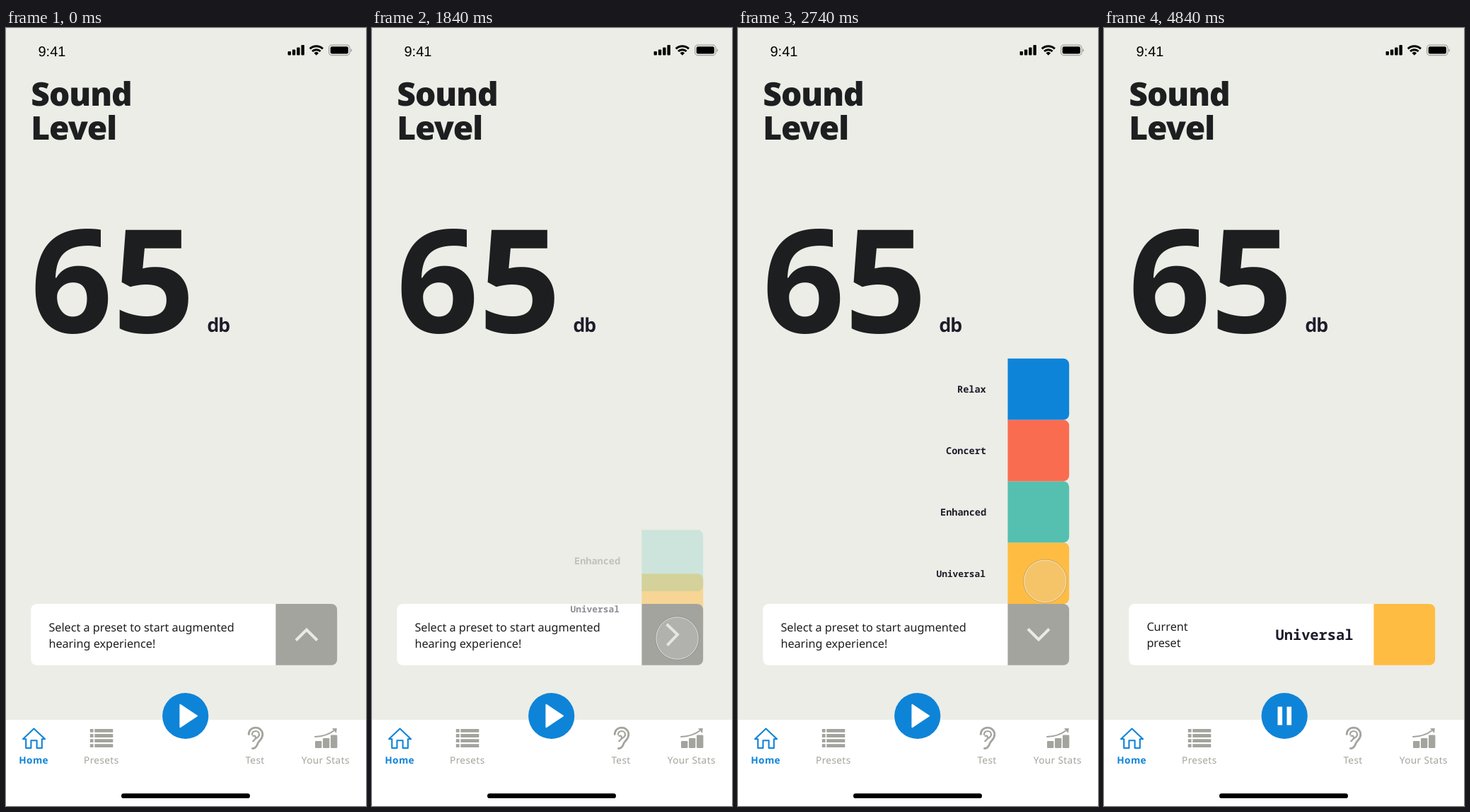
An HTML page for the animation above (5.42 s loop, 509x1101 px).

```html
<!DOCTYPE html>
<html lang="en">
<head>
<meta charset="utf-8">
<title>Sound Level</title>
<style>
  html, body { margin: 0; width: 100%; height: 100%; overflow: hidden; background: #ecede6; }
  svg { display: block; width: 509px; height: 1101px; text-rendering: geometricPrecision; }
  text { fill: #1d1e20; white-space: pre; }
  .body { font: 400 16.2px "Noto Sans", "Open Sans", sans-serif; }
  .title { font: 800 46.1px "Open Sans", sans-serif; letter-spacing: -1px; }
  .mono { font: 600 13.57px "Noto Sans Mono", monospace; fill: #1e1c2b; }
  .tab { font: 400 13.57px "Noto Sans", "Open Sans", sans-serif; letter-spacing: .4px; text-anchor: middle; fill: #a3a49d; }
  .gray { fill: #a3a49d; }
  .blue { fill: #0e84d8; }
  .line { fill: none; stroke: #a3a49d; stroke-width: 2.8; stroke-linecap: round; stroke-linejoin: round; }
</style>
</head>
<body>
<svg viewBox="0 0 509 1101">
  <rect width="509" height="1101" fill="#ecede6"/>

  <!-- status bar -->
  <text x="45.5" y="39.5" style="font:20px 'Liberation Sans',Arial,sans-serif;fill:#000">9:41</text>
  <g>
    <rect x="398.5" y="33" width="4.4" height="5.5" rx="1"/>
    <rect x="404.8" y="30.5" width="4.4" height="8" rx="1"/>
    <rect x="411.1" y="27.5" width="4.4" height="11" rx="1"/>
    <rect x="417.4" y="24" width="4.4" height="14.5" rx="1"/>
  </g>
  <g fill="none" stroke="#000" stroke-width="2.9">
    <path d="M429.7 29.4a13.2 13.2 0 0 1 18.2 0"/>
    <path d="M433 33a8.4 8.4 0 0 1 11.6 0"/>
  </g>
  <path d="M438.8 38.8l-3.3-3.4a4.8 4.8 0 0 1 6.6 0z"/>
  <rect x="456.6" y="24.2" width="29.4" height="14.4" rx="4" fill="none" stroke="#a0a19d" stroke-width="1.2"/>
  <rect x="458.7" y="26.3" width="25.2" height="10.2" rx="2.2"/>
  <path d="M487.4 29v5q1.7-1 1.7-2.5t-1.7-2.5" fill="#a0a19d"/>

  <text class="title" x="35.3" y="110">Sound</text>
  <text class="title" x="35.3" y="158">Level</text>
  <text x="34.6" y="430.8" style="font:700 203.5px 'Open Sans',sans-serif">65</text>
  <text class="mono" x="284.5" y="430" style="font-size:27.1px">db</text>

  <g id="tiles"></g>

  <!-- preset card -->
  <rect x="35.3" y="815" width="432.9" height="86.8" rx="8.1" fill="#fff"/>
  <path id="side" d="M381.4 815h78.7a8.1 8.1 0 0 1 8.1 8.1v70.6a8.1 8.1 0 0 1-8.1 8.1h-78.7z"/>
  <g id="prompt">
    <text class="body" x="60.4" y="854">Select a preset to start augmented</text>
    <text class="body" x="60.4" y="877">hearing experience!</text>
    <path id="chevron" d="M410 866.5l15-15 15 15" fill="none" stroke="#e9eae3" stroke-width="4"/>
  </g>
  <g id="current">
    <text class="body" x="60.4" y="853">Current</text>
    <text class="body" x="60.4" y="876">preset</text>
    <text class="mono" x="242.5" y="866" style="font-size:20.36px">Universal</text>
  </g>
  <g id="names"></g>

  <!-- tab bar -->
  <rect y="979" width="509" height="122" fill="#fff"/>
  <path d="M24 1006.2L39.5 991.5 55 1006.2H50.8V1019H43.6V1008.2H35.4V1019H28.2V1006.2z" fill="none" stroke="#0e84d8" stroke-width="2.1" stroke-linejoin="round"/>
  <path d="M121.2 992v27" fill="none" stroke="#a3a49d" stroke-width="4.8" stroke-dasharray="4.8 2.3"/>
  <path d="M138.3 992v27" fill="none" stroke="#a3a49d" stroke-width="26" stroke-dasharray="4.8 2.3"/>
  <path class="line" d="M343.2 999.5c0-5.5 4.2-9.3 9.8-9.3s9.8 4 9.8 9.6c0 7.2-5.6 8.6-7.2 13.4-1.1 3.3-2.6 6.4-7.2 6.4"/>
  <path class="line" d="M348 1000c0-3 2-5 5-5s5 2.2 5 5c0 3.4-3.4 4.4-5.6 6.2m-3-4.4c3-.8 4.6 1.4 3 4.2-.8 1.4-1.8 2.4-3.2 3.2" style="stroke-width:2.2"/>
  <g class="gray">
    <rect x="437" y="1009" width="9.4" height="10" rx="1.3"/>
    <rect x="448" y="1005" width="9.4" height="14" rx="1.3"/>
    <rect x="459" y="1000.5" width="9.4" height="18.5" rx="1.3"/>
    <path d="M461 991.2l6.8-.2-.8 7z"/>
  </g>
  <path d="M437 1003q16-.5 27-9" class="line" style="stroke-width:2"/>
  <text class="tab" x="39.2" y="1041" style="font-weight:800;fill:#0e84d8">Home</text>
  <text class="tab" x="134.8" y="1041">Presets</text>
  <text class="tab" x="352" y="1041">Test</text>
  <text class="tab" x="451.8" y="1041">Your Stats</text>
  <rect x="163" y="1083.3" width="182" height="6.8" rx="3.4"/>

  <g id="button">
    <circle class="blue" cx="253.7" cy="973.5" r="32.6"/>
    <path id="play" d="M246.4 957.8l23.6 15.7-23.6 15.7z" fill="#fff" stroke="#fff" stroke-width="2" stroke-linejoin="round"/>
    <path id="pause" d="M244 960.5h6.6v26H244zM257 960.5h6.6v26H257z" fill="#fff"/>
  </g>

  <g id="touch">
    <circle r="30.5" fill="#d9d9d9" fill-opacity=".26"/>
    <circle r="29.8" fill="none" stroke="#fff" stroke-opacity=".6"/>
    <circle r="30.7" fill="none" stroke="#6f776f" stroke-opacity=".42" stroke-width=".9"/>
  </g>
</svg>
<script>
const LOOP = 5420, OPEN = 1759, RISE = 405, STAGGER = 52, PICK = 3434, SLOT = 86.8;
const $ = id => document.getElementById(id);
const clamp = v => Math.min(1, Math.max(0, v));
const cubicOut = v => 1 - (1 - clamp(v)) ** 3;
const quadOut = v => 1 - (1 - clamp(v)) ** 2;
const show = (id, on) => $(id).setAttribute('visibility', on ? 'visible' : 'hidden');
const move = (el, x, y) => el.setAttribute('transform', `translate(${x} ${y})`);

function add(parent, tag, attrs, text = '') {
  const el = document.createElementNS('http://www.w3.org/2000/svg', tag);
  for (const k in attrs) el.setAttribute(k, attrs[k]);
  el.textContent = text;
  return $(parent).appendChild(el);
}

// name, colour, label x, label size, label travel; from the bottom up
const presets = [
  ['Universal', '#ffbc42', 280.5, 12.85, 100],
  ['Enhanced', '#55c0b0', 286, 13.57, SLOT],
  ['Concert', '#fa6c50', 294, 13.57, SLOT],
  ['Relax', '#0e84d8', 310, 13.57, SLOT]
].map(([name, fill, x, size, travel], i) => {
  const y = 815 - SLOT * (i + 1);
  return {
    travel,
    tile: add('tiles', 'path', { fill, d: `M381.4 ${y}h78.7a8.1 8.1 0 0 1 8.1 8.1v70.6a8.1 8.1 0 0 1-8.1 8.1h-78.7z` }),
    label: add('names', 'text', { class: 'mono', x, y: y + 48.5, style: `font-size:${size}px` }, name)
  };
});

// touch point: time, x, y
const path = [
  [580, 466, -32], [780, 449.5, 757], [1020, 449.5, 757], [1120, 410, 868],
  [1200, 397, 895], [1290, 405, 910], [1540, 431.5, 863.5], [2425, 431.5, 863.5],
  [2800, 434.5, 777], [4160, 434.5, 777], [4380, 467, 178], [4600, 467, 178], [4840, 492, -40]
];

// slope at a key, flat at rests and turning points
function slope(i, k) {
  const a = path[i - 1], b = path[i], c = path[i + 1];
  if (!a || !c || (b[k] - a[k]) * (c[k] - b[k]) <= 0) return 0;
  return (c[k] - a[k]) / (c[0] - a[0]);
}

function along(t, k) {
  const last = path.length - 1;
  if (t <= path[0][0]) return path[0][k];
  if (t >= path[last][0]) return path[last][k];
  const i = path.findIndex(p => p[0] > t) - 1, a = path[i], b = path[i + 1];
  const d = b[0] - a[0], u = (t - a[0]) / d, w = 1 - u;
  return w * w * (1 + 2 * u) * a[k] + u * u * (3 - 2 * u) * b[k]
    + d * u * w * (w * slope(i, k) - u * slope(i + 1, k));
}

function draw(t) {
  const picked = t >= PICK;
  presets.forEach(({ tile, label, travel }, i) => {
    const p = picked ? 0 : cubicOut((t - OPEN - STAGGER * i) / RISE);
    move(tile, 0, (1 - p) * SLOT);
    move(label, 0, (1 - p) * travel);
    tile.setAttribute('opacity', p);
    label.setAttribute('opacity', p);
  });
  $('chevron').setAttribute('transform', `rotate(${180 * cubicOut((t - OPEN) / RISE)} 425 858.5)`);
  $('side').setAttribute('fill', picked ? '#ffbc42' : '#a3a49d');
  show('prompt', !picked);
  show('play', !picked);
  show('pause', picked);
  const fade = quadOut((t - PICK) / 290);
  $('current').setAttribute('opacity', fade);
  move($('button'), 1.5 * fade, 0);
  move($('touch'), along(t, 1), along(t, 2));
}

const start = performance.now();
function tick() {
  draw((performance.now() - start) % LOOP);
  requestAnimationFrame(tick);
}
tick();
</script>
</body>
</html>
```
